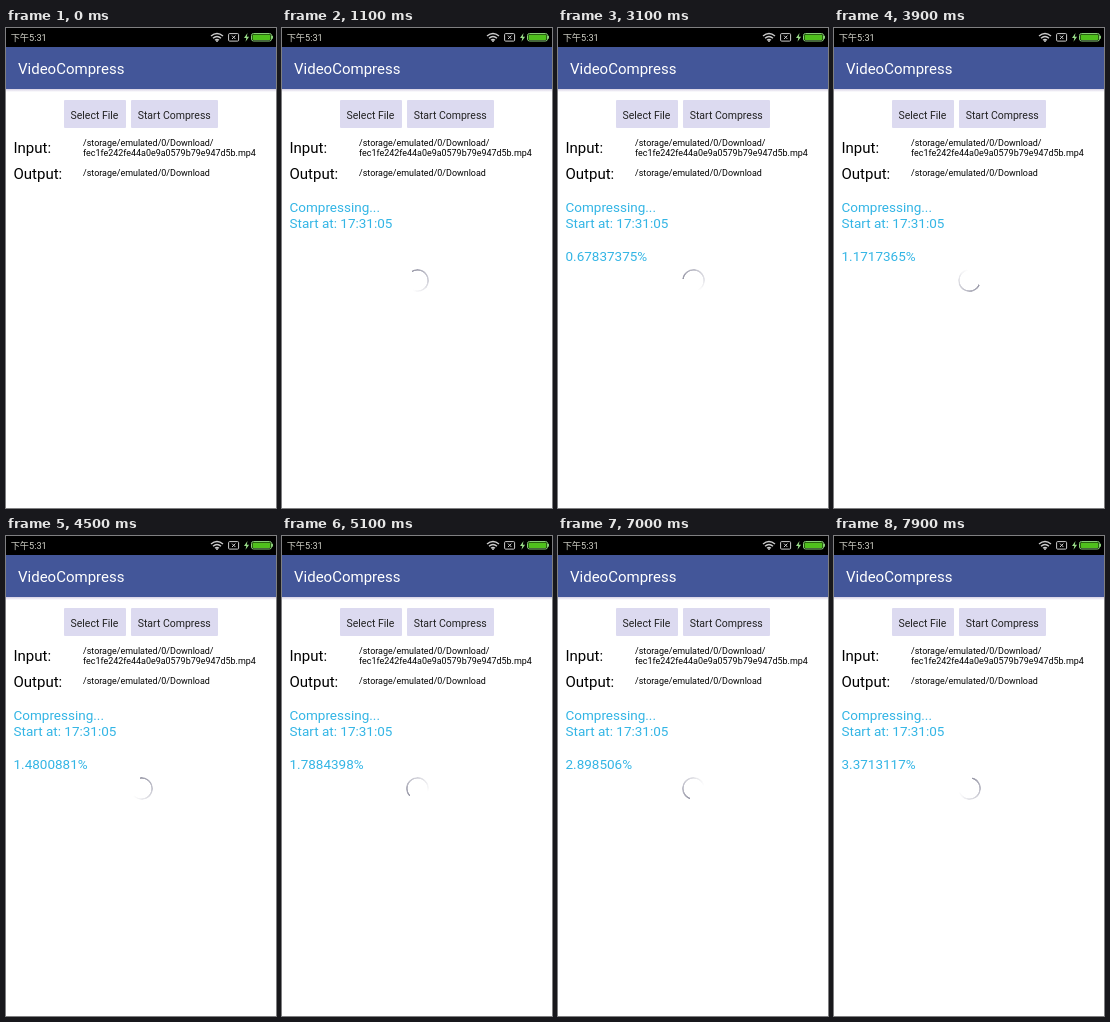
Write an HTML page that moves like this. It is 270x480 px and loops after 8 s.

```html
<!DOCTYPE html>
<html lang="en">
<head>
<meta charset="utf-8">
<title>VideoCompress</title>
<style>
  html, body { margin: 0; width: 100%; height: 100%; overflow: hidden; background: #fff; }
  svg { display: block; width: 270px; height: 480px; font-family: Roboto, "Noto Sans CJK SC", "Noto Sans CJK", sans-serif; }
  .title { font-size: 15px; }
  .button { font-size: 10.5px; }
  .path { font-size: 8.95px; }
  .clock { font-size: 9.2px; fill: #d2d2c8; }
  .status { font-size: 13.5px; fill: #33b5e5; }
  #spinner {
    position: absolute; left: 123.5px; top: 240.5px; width: 23px; height: 23px; border-radius: 50%;
    background: conic-gradient(#889d 0deg, #99a9 90deg, #99a2 200deg, #99a0 240deg);
    -webkit-mask: radial-gradient(closest-side, #0000 83%, #000 88%);
    mask: radial-gradient(closest-side, #0000 83%, #000 88%);
  }
</style>
</head>
<body>
<svg viewBox="0 0 270 480">
  <defs>
    <linearGradient id="shadow" x2="0" y2="1">
      <stop stop-color="#d6d0e4"/>
      <stop offset="1" stop-color="#fff"/>
    </linearGradient>
  </defs>

  <rect y="61" width="270" height="3" fill="url(#shadow)"/>
  <rect y="19" width="270" height="42" fill="#435699"/>
  <rect width="270" height="19"/>

  <!-- status bar -->
  <text class="clock" x="4.7" y="12.7">下午5:31</text>
  <g fill="none" stroke="#ccc" stroke-width="1.4">
    <path d="M205 8q6-5 12 0M207 10.2q4-3.4 8 0M209 12.2q2-1.6 4 0"/>
    <rect x="222.6" y="5.6" width="10" height="7.5" rx="1" stroke-width="1"/>
    <path d="M226 7.6l3.4 3.4m0-3.4l-3.4 3.4" stroke-width="1"/>
    <rect x="245.5" y="5.5" width="20" height="7.5" rx="2" stroke="#8c7" stroke-width="1"/>
  </g>
  <circle cx="211" cy="13" r="1" fill="#ccc"/>
  <path d="M241.5 5l-3.5 5h2.3l-.8 3.8 3.6-5h-2.3z" fill="#9d8"/>
  <rect x="246.5" y="6.5" width="18" height="5.5" rx="1" fill="#4fc01c"/>
  <rect x="266" y="7.7" width="1" height="3" fill="#8c7"/>

  <text class="title" x="12" y="46" fill="#fff">VideoCompress</text>

  <g fill="#dcdaf0">
    <rect x="58" y="72" width="62" height="28" rx="1"/>
    <rect x="125" y="72" width="87" height="28" rx="1"/>
  </g>
  <g class="button" fill="#222">
    <text x="64.5" y="90.6">Select File</text>
    <text x="131.7" y="90.6">Start Compress</text>
  </g>

  <text class="title" x="7.5" y="125.3">Input:</text>
  <text class="path" x="77" y="117.5">/storage/emulated/0/Download/</text>
  <text class="path" x="77" y="128.2">fec1fe242fe44a0e9a0579b79e947d5b.mp4</text>
  <text class="title" x="7.5" y="151">Output:</text>
  <text class="path" x="77" y="148">/storage/emulated/0/Download</text>

  <g id="job" class="status">
    <text x="7.5" y="184">Compressing...</text>
    <text x="7.5" y="200">Start at: 17:31:05</text>
    <text id="percent" x="7.5" y="233"></text>
  </g>
</svg>
<div id="spinner"></div>
<script>
const LOOP = 8000, STEP = 100, JOB_START = 700;
const FRAME_US = 40000, DURATION_US = Math.fround(194583000);
const SPIN = -0.205; // degrees per ms
// [time in ms, video frames encoded so far]
const pace = [[1700, 0], [1900, 4], [3100, 33], [3900, 57], [5100, 87], [6200, 120], [7900, 164]];
const [job, percent, spinner] = ['job', 'percent', 'spinner'].map(id => document.getElementById(id));

function framesAt(t) {
  const i = pace.findIndex(([end]) => t <= end);
  const [t0, n0] = pace[i - 1], [t1, n1] = pace[i];
  return Math.round(n0 + (n1 - n0) * (t - t0) / (t1 - t0));
}

// Shortest decimal that identifies a 32-bit float
function floatText(x) {
  let digits = 1;
  while (Math.fround(x.toPrecision(digits)) !== x) digits++;
  return x.toPrecision(digits);
}

function percentText(t) {
  if (t <= pace[0][0]) return '';
  const ratio = Math.fround(framesAt(t) * FRAME_US / DURATION_US);
  return floatText(Math.fround(ratio * 100)) + '%';
}

function draw(now) {
  const t = Math.floor(now % LOOP / STEP) * STEP;
  job.style.visibility = spinner.style.visibility = t >= JOB_START ? 'visible' : 'hidden';
  percent.textContent = percentText(t);
  spinner.style.transform = `rotate(${193 + t * SPIN}deg)`;
  requestAnimationFrame(draw);
}
requestAnimationFrame(draw);
</script>
</body>
</html>
```
